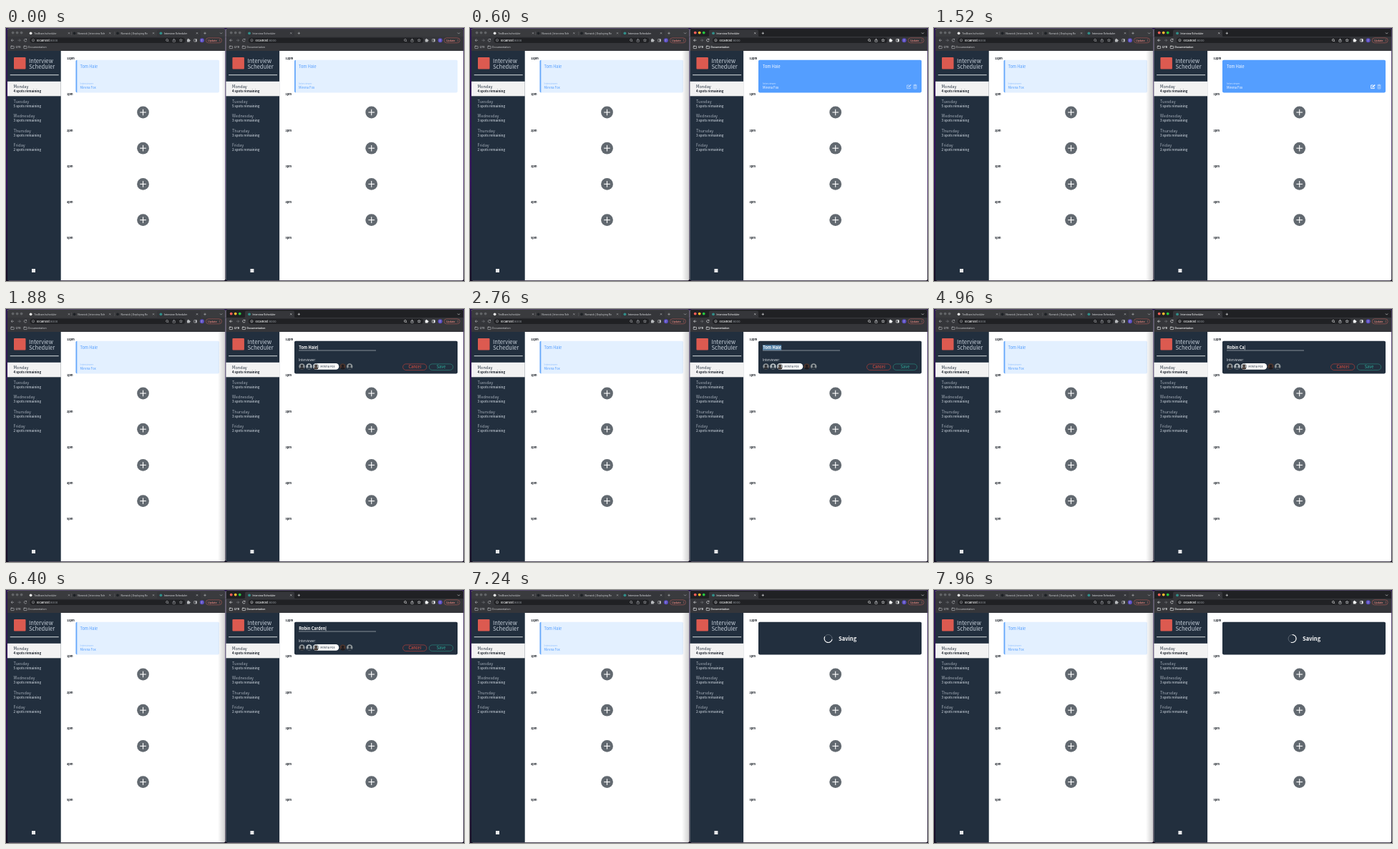
Write an HTML page with a canvas that moves like this. It is 640 by 354 pixels and loops after 8 s.

```html
<!DOCTYPE html>
<html lang="en">
<head>
<meta charset="utf-8">
<title>Interview Scheduler</title>
<style>
  html, body { margin: 0; width: 100%; height: 100%; overflow: hidden; background: #17131f; }
  canvas { display: block; width: 640px; height: 354px; }
</style>
</head>
<body>
<canvas id="stage"></canvas>
<script>
const W = 640, H = 354, LOOP = 8000;
const canvas = document.getElementById('stage');
const ctx = canvas.getContext('2d');
const dpr = window.devicePixelRatio || 1;
canvas.width = W * dpr;
canvas.height = H * dpr;

const SANS = '"Noto Sans CJK JP", "Noto Sans CJK SC", "Noto Sans CJK", "Open Sans", sans-serif';
const UI = 'Inter, Roboto, sans-serif';
const NAVY = '#222f3e';
const STUDENT = 'Tom Hale', INTERVIEWER = 'Mirena Fox', TYPED = 'Robin Carden';
const DAYS = [['Monday', 4], ['Tuesday', 5], ['Wednesday', 3], ['Thursday', 3], ['Friday', 2]];
const HOURS = ['12pm', '1pm', '2pm', '3pm', '4pm', '5pm'];
const ROW = 50.2;
const CARD = { y: 44.8, h: 45.6 };

// Event times in ms
const ACTIVATE = 40, ICON_HOVER = 920, EDIT = 1680, SELECT = 2520, SAVE = 7240;
const KEYS = [3520, 3680, 3760, 3880, 4040, 4200, 4600, 4960, 5080, 5160, 5240, 5300];

function rect(x, y, w, h, fill) {
  ctx.fillStyle = fill;
  ctx.fillRect(x, y, w, h);
}

function round(x, y, w, h, r, fill, stroke, lw = 0.6) {
  ctx.beginPath();
  ctx.roundRect(x, y, w, h, r);
  if (fill) { ctx.fillStyle = fill; ctx.fill(); }
  if (stroke) { ctx.strokeStyle = stroke; ctx.lineWidth = lw; ctx.stroke(); }
}

function disc(x, y, r, fill) {
  ctx.beginPath();
  ctx.arc(x, y, r, 0, Math.PI * 2);
  ctx.fillStyle = fill;
  ctx.fill();
}

function arc(x, y, r, a, b, color, lw) {
  ctx.beginPath();
  ctx.arc(x, y, r, a, b);
  ctx.strokeStyle = color;
  ctx.lineWidth = lw;
  ctx.stroke();
}

function line(color, lw, ...pts) {
  ctx.beginPath();
  for (let i = 0; i < pts.length; i += 2) ctx.lineTo(pts[i], pts[i + 1]);
  ctx.strokeStyle = color;
  ctx.lineWidth = lw;
  ctx.stroke();
}

// Fonts are set ten times larger and scaled down for precise advances.
// Returns the width of the text.
function text(str, x, y, size, color, weight = 400, family = SANS, align = 'left') {
  ctx.save();
  ctx.translate(x, y);
  ctx.scale(0.1, 0.1);
  ctx.font = `${weight} ${size * 10}px ${family}`;
  ctx.textAlign = align;
  ctx.fillStyle = color;
  ctx.fillText(str, 0, 0);
  const width = ctx.measureText(str).width / 10;
  ctx.restore();
  return width;
}

function textWidth(str, size, weight) {
  ctx.font = `${weight} ${size * 10}px ${SANS}`;
  return ctx.measureText(str).width / 10;
}

function cross(x, y, r, color, lw = 0.6) {
  line(color, lw, x - r, y - r, x + r, y + r);
  line(color, lw, x - r, y + r, x + r, y - r);
}

function plus(x, y, r, color, lw) {
  line(color, lw, x - r, y, x + r, y);
  line(color, lw, x, y - r, x, y + r);
}

function star(x, y, r, color) {
  ctx.beginPath();
  for (let i = 0; i < 10; i++) {
    const a = -Math.PI / 2 + i * Math.PI / 5, d = i % 2 ? r * 0.45 : r;
    ctx.lineTo(x + d * Math.cos(a), y + d * Math.sin(a));
  }
  ctx.closePath();
  ctx.strokeStyle = color;
  ctx.lineWidth = 0.5;
  ctx.stroke();
}

function folder(x, y, color) {
  round(x - 2.2, y - 1.4, 4.4, 3.2, 0.4, null, color, 0.6);
  rect(x - 2.2, y - 2, 2, 0.8, color);
}

function trafficLights(x, active) {
  const colors = active ? ['#fe5f57', '#febc2e', '#28c840'] : ['#626467', '#626467', '#626467'];
  colors.forEach((c, i) => disc(x + i * 6, 6.6, 1.9, c));
}

function activeTab(x0, x1) {
  ctx.beginPath();
  ctx.moveTo(x0 - 2, 12.5);
  ctx.quadraticCurveTo(x0, 12.5, x0, 10.5);
  ctx.lineTo(x0, 4.5);
  ctx.quadraticCurveTo(x0, 2.5, x0 + 2, 2.5);
  ctx.lineTo(x1 - 2, 2.5);
  ctx.quadraticCurveTo(x1, 2.5, x1, 4.5);
  ctx.lineTo(x1, 10.5);
  ctx.quadraticCurveTo(x1, 12.5, x1 + 2, 12.5);
  ctx.fillStyle = '#35363a';
  ctx.fill();
}

function tab(x, label, icon, closeX, color) {
  disc(x, 7.3, 1.9, icon);
  text(label, x + 4.6, 8.6, 3.35, color, 500, UI);
  cross(closeX, 7.3, 1.1, color, 0.5);
}

function toolbar(x, right, active) {
  const fg = active ? '#f1f3f4' : '#b9bbbe', dim = '#7d8085';
  rect(x, 12, right - x, 20, '#35363a');
  // back, forward, reload
  line(fg, 0.6, x + 9, 17.2, x + 5.2, 17.2);
  line(fg, 0.6, x + 7, 15.4, x + 5.2, 17.2, x + 7, 19);
  line(dim, 0.6, x + 14.5, 17.2, x + 18.3, 17.2);
  line(dim, 0.6, x + 16.5, 15.4, x + 18.3, 17.2, x + 16.5, 19);
  arc(x + 25, 17.2, 1.8, 0.3, 5.6, fg, 0.6);
  rect(x + 25.8, 15.2, 1.2, 1.2, fg);
  // address bar
  round(x + 31.5, 13.6, right - 56 - x - 31.5, 7.4, 3.7, '#202124');
  arc(x + 36, 17.2, 1.7, 0, 7, fg, 0.5);
  rect(x + 35.75, 16.9, 0.5, 1.3, fg);
  const host = text('localhost', x + 41, 18.8, 4.1, '#f4f5f6', 500, UI);
  text(':8000', x + 41 + host, 18.8, 4.1, '#9aa0a6', 400, UI);
  const s = right - 81;
  arc(s - 0.3, 16.9, 1.5, 0, 7, fg, 0.6);
  line(fg, 0.6, s + 0.9, 18.1, s + 2, 19.2);
  round(s + 7.6, 16.4, 3.4, 3, 0.3, null, fg, 0.5);
  line(fg, 0.5, s + 9.3, 18, s + 9.3, 14.5);
  star(s + 19, 17.3, 2.2, fg);
  // extensions, side panel, profile
  round(s + 27.6, 15.8, 3.8, 3.6, 0.5, fg);
  disc(s + 29.3, 15.6, 0.9, fg);
  disc(s + 31.6, 17.5, 0.8, fg);
  round(s + 37.3, 15.5, 3.8, 3.6, 0.4, null, fg, 0.6);
  rect(s + 39.4, 15.5, 1.7, 3.6, fg);
  disc(s + 48.5, 17.3, 3, '#5c4fc4');
  text('T', s + 48.5, 18.5, 3.2, '#ffffff', 400, UI, 'center');
  round(right - 27, 13.8, 22, 7, 3.5, null, '#c9635c', 0.5);
  text('Update', right - 24.3, 18.6, 3.6, '#ee8a82', 500, UI);
  for (let i = -1; i < 2; i++) disc(right - 8, 17.3 + i * 1.3, 0.4, '#ee8a82');
  // bookmarks
  const weight = active ? 600 : 500;
  folder(x + 7, 26.8, fg);
  text('QTB', x + 11.4, 28, 3.5, fg, weight, UI);
  folder(x + 25, 26.8, fg);
  text('Documentation', x + 29, 28, 3.5, fg, weight, UI);
}

function sidebar(x) {
  rect(x, 32, 74.7, 321, NAVY);
  round(x + 9, 41, 16.5, 16.5, 1, '#dc5a50');
  text('Interview', x + 30, 49, 7.7, '#c9d2dc', 300);
  text('Scheduler', x + 30, 56.8, 7.7, '#c9d2dc', 300);
  rect(x + 3.7, 65.3, 68, 0.9, '#f0f4f5');
  rect(x, 74.8, 74.7, 20.5, '#f2f2f2');
  DAYS.forEach(([day, spots], i) => {
    const y = 84.1 + i * 20.5, on = i === 0;
    text(day, x + 8.6, y, 5.55, on ? NAVY : '#a5aeb9');
    text(`${spots} spots remaining`, x + 8.6, y + 6, 4.4, on ? '#151c26' : '#a9b2bc', 700);
  });
  rect(x + 34, 337, 5, 5, '#e6e7e9');
}

function schedule(x, cardR) {
  const mid = (x + 83 + cardR) / 2;
  HOURS.forEach((hour, i) => {
    text(hour, x + 83, 44.2 + i * ROW, 3.9, '#10161e', 700);
    if (i === 0 || i === 5) return;
    const cy = 118 + (i - 1) * ROW;
    disc(mid, cy, 8.4, '#626970');
    plus(mid, cy, 4.3, '#ffffff', 1.1);
  });
}

function editIcon(x, y, alpha) {
  const c = `rgba(255,255,255,${alpha})`, lw = alpha === 1 ? 0.9 : 0.7;
  line(c, lw, x + 0.3, y - 2, x - 2.8, y - 2, x - 2.8, y + 2.6, x + 1.8, y + 2.6, x + 1.8, y + 0.8);
  line(c, lw + 0.5, x - 0.9, y + 0.9, x + 2.8, y - 2.6);
}

function trashIcon(x, y) {
  const c = 'rgba(255,255,255,.65)';
  round(x - 1.9, y - 1.5, 3.8, 4.5, 0.4, null, c, 0.7);
  line(c, 0.7, x - 2.6, y - 2.2, x + 2.6, y - 2.2);
  line(c, 0.6, x - 0.9, y - 3, x + 0.9, y - 3);
  line(c, 0.5, x - 0.6, y - 0.5, x - 0.6, y + 2.2);
  line(c, 0.5, x + 0.6, y - 0.5, x + 0.6, y + 2.2);
}

function showCard(x, r, hover, iconHover) {
  const main = hover ? '#ffffff' : '#4f9bff', label = hover ? '#cfe3ff' : '#8fbfff';
  round(x, CARD.y, r - x, CARD.h, 1.8, hover ? '#549eff' : '#e3f0ff');
  if (!hover) round(x, CARD.y, 1.8, CARD.h, [1.8, 0, 0, 1.8], '#66a8fb');
  text(STUDENT, x + 6, 55.9, 5.6, main);
  text('Interviewer', x + 6, 79.2, 3.5, label, 300);
  text(INTERVIEWER, x + 6, 84.6, 4.4, main);
  if (!hover) return;
  editIcon(613.5, 82, iconHover ? 1 : 0.7);
  trashIcon(622, 82);
}

function avatar(x, bg, body) {
  const y = 80.4;
  ctx.save();
  ctx.beginPath();
  ctx.arc(x, y, 4.2, 0, Math.PI * 2);
  ctx.clip();
  rect(x - 5, y - 5, 10, 10, bg);
  disc(x, y - 0.9, 1.8, body);
  disc(x, y + 4.4, 3.6, body);
  ctx.restore();
}

function button(x, w, label, color, edge) {
  round(x, 76.9, w, 8.6, 4.3, null, edge, 0.6);
  text(label, x + w / 2, 83.2, 5.6, color, 500, SANS, 'center');
}

function darkCard() {
  round(403, CARD.y, 228, CARD.h, 1.8, NAVY);
}

function formCard(t) {
  darkCard();
  const typed = KEYS.filter(k => t >= k);
  const value = typed.length ? TYPED.slice(0, typed.length) : STUDENT;
  const w = textWidth(value, 5.6, 700);
  const selected = t >= SELECT && !typed.length;
  if (selected) rect(409, 50.3, w + 0.4, 7.3, '#4f7fa6');
  text(value, 409.2, 56.1, 5.6, '#ffffff', 700);
  const last = typed.length ? typed[typed.length - 1] : EDIT;
  if (!selected && (t - last) % 1000 < 500) rect(409.5 + w, 50.7, 0.6, 6.6, '#ffffff');
  rect(409, 57.7, 108, 0.6, '#c3c9cf');

  text('Interviewer:', 409, 73.3, 4.3, '#e9edf1');
  round(429, 76.1, 36.2, 8.6, 4.3, '#ffffff');
  avatar(413.5, '#8d9397', '#2b2d31');
  avatar(423.5, '#b9c0c4', '#36424d');
  avatar(433.2, '#a7adb0', '#463a35');
  text(INTERVIEWER, 439.3, 81.9, 4, NAVY);
  avatar(470.6, '#4a342d', '#1d1b1f');
  avatar(480.2, '#8f9699', '#27323d');
  button(554.6, 33.2, 'Cancel', '#f8503f', '#c94239');
  button(591.3, 33.4, 'Save', '#2fb5a2', '#2a9485');
}

function savingCard(t) {
  darkCard();
  const a = -Math.PI / 2 + (t - 7960) / 1000 * Math.PI * 2;
  arc(500.6, 68, 5.5, 0, 7, '#59636f', 1);
  arc(500.6, 68, 5.5, a, a + Math.PI * 1.1, '#ffffff', 1.1);
  text('Saving', 515, 70.8, 7.55, '#ffffff', 700);
}

function leftWindow(active) {
  round(2, 0.8, 304.4, 352.4, 2, '#ffffff');
  round(2, 0.8, 304.4, 12, [2, 2, 0, 0], '#3a3b3e');
  trafficLights(9.6, false);
  activeTab(211, 272);
  const fg = '#bdbfc2';
  tab(34.6, 'TeoBram/scheduler', '#e8e8e8', 88, fg);
  tab(95.6, 'Norwick | Interview Sch', '#1d2125', 145.3, fg);
  tab(156, 'Norwick | Deploying Rv', '#1d2125', 206, fg);
  tab(216.4, 'Interview Scheduler', '#318f8a', 267, '#d0d2d5');
  rect(91.3, 5, 0.4, 5, '#6a6d71');
  rect(151.7, 5, 0.4, 5, '#6a6d71');
  plus(278, 7.3, 1.7, fg, 0.6);
  line(fg, 0.6, 299, 6.5, 300.6, 8.1, 302.2, 6.5);
  toolbar(2, 306.4, false);
  sidebar(2);
  schedule(2, 298);
  showCard(97.5, 298, false);
  // shadow cast by the window on the right
  const g = ctx.createLinearGradient(active ? 296 : 301, 0, 306.4, 0);
  g.addColorStop(0, 'rgba(0,0,0,0)');
  g.addColorStop(1, active ? 'rgba(0,0,0,.19)' : 'rgba(0,0,0,.1)');
  rect(296, 32, 10.4, 321, g);
}

function rightWindow(t, active) {
  round(307.4, 0.8, 331.8, 352.4, 2, '#ffffff');
  round(307.4, 0.8, 331.8, 12, [2, 2, 0, 0], active ? '#202124' : '#3a3b3e');
  trafficLights(314.7, active);
  activeTab(334, 403);
  const fg = active ? '#f1f3f4' : '#bdbfc2';
  tab(340, 'Interview Scheduler', '#318f8a', 398.3, fg);
  plus(409.3, 7.3, 1.7, fg, 0.6);
  line(fg, 0.6, 631, 6.5, 632.6, 8.1, 634.2, 6.5);
  toolbar(307.4, 639.2, active);
  sidebar(307.4);
  schedule(307.4, 631);
  if (t < EDIT) showCard(403, 631, active, t >= ICON_HOVER);
  else if (t < SAVE) formCard(t);
  else savingCard(t);
}

function draw(now) {
  const t = now % LOOP, active = t >= ACTIVATE;
  ctx.setTransform(dpr, 0, 0, dpr, 0, 0);
  const desk = ctx.createLinearGradient(0, 0, 0, H);
  desk.addColorStop(0, '#2b1750');
  desk.addColorStop(0.6, '#32105a');
  desk.addColorStop(1, '#140d22');
  rect(0, 0, W, H, desk);
  leftWindow(active);
  rightWindow(t, active);
}

const start = performance.now();
function tick() {
  draw(performance.now() - start);
  requestAnimationFrame(tick);
}
tick();
</script>
</body>
</html>
```
